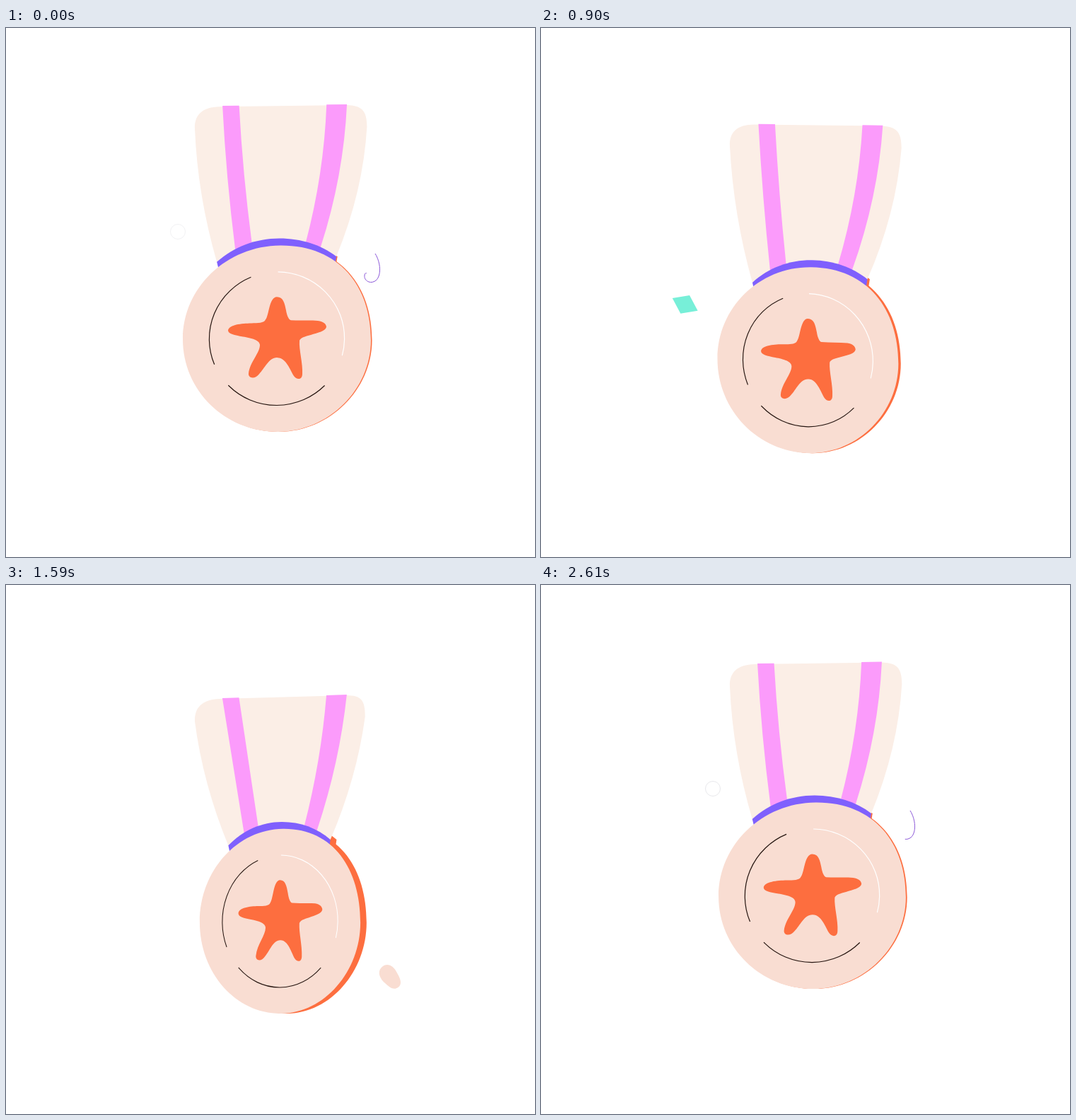
An HTML page with a canvas for the animation above (2.64 s loop, 748x748 px).

```html
<!DOCTYPE html>
<html lang="en">
<head>
<meta charset="utf-8">
<title>Medal</title>
<style>
  html, body { margin: 0; width: 100%; height: 100%; overflow: hidden; background: #fff; }
  canvas { display: block; }
</style>
</head>
<body>
<canvas id="stage" width="748" height="748"></canvas>
<script>
const ctx = document.getElementById('stage').getContext('2d');
const LOOP = 2640, STEP = 30, RAD = Math.PI / 180;
const CREAM = '#fbeee6', PEACH = '#f9ddd2', PINK = '#fb9bfb';
const PURPLE = '#7f60fd', ORANGE = '#fd6e3f', MINT = '#1de5be', DARK = '#24140f';

// time, medal centre x and y, medal half width, ribbon top, swing
const poses = [
  [0, 383, 439.2, 133, 109, -0.9],
  [390, 377.2, 448.5, 137.2, 111, 2],
  [690, 376.2, 460, 133.2, 123.3, 2.5],
  [1110, 379.6, 477, 122.5, 148.5, 1.7],
  [1590, 387.5, 475.5, 113.6, 157.5, -1.4],
  [2220, 389.7, 448.6, 122.8, 128.5, -3.4]
];

// Medal shapes, drawn around the medal centre
const face = new Path2D('M5-132C88-132 133-74 133 3C133 73 73 132 2 132C-73 132-133 73-133 0C-133-73-71-132 5-132Z');
const band = new Path2D('M-84-109C-60-131-28-142 4-142C34-142 63-133 85-116L83-104L0-90L-82-101Z');
const star = new Path2D('M0-59C9-59 11-50 13-40C14-33 17-26 20-26C32-25 46-26 58-25C66-24 70-20 70-16' +
  'C69-10 58-8 48-5C40-3 33-1 32 3C31 16 37 36 36 50C36 59 28 59 24 53C19 45 13 27 1 27' +
  'C-11 26-17 42-25 50C-31 58-41 56-40 49C-38 33-24 20-24 9C-24 2-36-1-48-3C-60-5-69-7-69-12' +
  'C-68-20-50-22-36-22C-27-22-18-22-16-27C-11-33-11-59 0-59Z');
const curl = new Path2D('M522 319C530 332 531 350 523 357C515 363 506 357 507 350C507 347 509 346 510 347');
const blob = new Path2D('M-19 0C-19-9-10-13 0-11C10-10 18-8 18 0C18 9 8 10-1 12C-11 13-19 9-19 0Z');

const clamp = x => Math.max(0, Math.min(1, x));
const ease = x => { x = clamp(x); return x * x * (3 - 2 * x); };
const bump = (t, a, b, c, d) => ease((t - a) / (b - a)) * (1 - ease((t - c) / (d - c)));

// Periodic cubic through the poses
function poseAt(t) {
  const n = poses.length;
  const key = i => {
    const turn = Math.floor(i / n), [time, ...rest] = poses[i - turn * n];
    return [time + turn * LOOP, ...rest];
  };
  let i = n - 1;
  while (poses[i][0] > t) i--;
  const [a, b, c, d] = [i - 1, i, i + 1, i + 2].map(key);
  const span = c[0] - b[0], u = (t - b[0]) / span;
  return [1, 2, 3, 4, 5].map(k => {
    const m = (c[k] - a[k]) / (c[0] - a[0]) * span;
    const w = (d[k] - b[k]) / (d[0] - b[0]) * span;
    return b[k] * (1 + 2 * u) * (1 - u) ** 2 + m * u * (1 - u) ** 2 +
      c[k] * u * u * (3 - 2 * u) + w * u * u * (u - 1);
  });
}

function fill(path, color) {
  ctx.fillStyle = color;
  ctx.fill(path);
}

function drawMedal(t) {
  const [cx, cy, rx, top, swing] = poseAt(t);
  const turn = 137.2 - rx, sx = rx / 133, sy = 1 - turn * 0.00045, skew = swing * 0.006;
  const place = dx => ctx.setTransform(sx, skew, 0, sy, cx + dx, cy);
  const reset = () => ctx.setTransform(1, 0, 0, 1, 0, 0);
  const hang = (u, v) => [cx + u * sx + swing, cy + v * sy + skew * u];
  const topY = x => top + (1.2 * swing - 0.4 - turn * 0.08) * (x - 394) / 146;

  // Back rim
  const rim = turn * 0.37;
  place(rim);
  fill(face, ORANGE);
  place(rim + swing);
  fill(band, ORANGE);
  reset();

  // Ribbon
  const right = 511 - turn * 0.14, sag = 0.1 + turn * 0.006;
  const [lx, ly] = hang(-84, -109), [ex, ey] = hang(85, -116);
  const yl = topY(267), yr = topY(right);
  const cloth = new Path2D();
  cloth.moveTo(lx, ly);
  cloth.quadraticCurveTo(267 + (lx - 267) * sag, (ly + yl + 32) / 2, 267, yl + 32);
  cloth.bezierCurveTo(266, yl + 12, 278, yl + 1, 302, topY(302) + 1);
  cloth.lineTo(482, topY(482) + 1);
  cloth.bezierCurveTo(502, yr + 2, right, yr + 8, right, yr + 32);
  cloth.quadraticCurveTo(right + (ex - right) * sag, (ey + yr + 32) / 2, ex, ey);
  cloth.lineTo(cx, cy - 90);
  fill(cloth, CREAM);

  const stripe = (x1, x2, u1, v1, u2, v2, bend) => {
    const [p, q] = hang(u1, v1), [r, s] = hang(u2, v2), y1 = topY(x1), y2 = topY(x2);
    const path = new Path2D();
    path.moveTo(x1, y1);
    path.quadraticCurveTo(x1 + (p - x1) * bend, (y1 + q) / 2, p, q);
    path.lineTo(p, q + 8);
    path.lineTo(r, s + 8);
    path.lineTo(r, s);
    path.quadraticCurveTo(x2 + (r - x2) * bend, (y2 + s) / 2, x2, y2);
    fill(path, PINK);
  };
  const shift = swing * 0.4;
  stripe(306.5 + shift, 330 + shift, -58, -127, -34.5, -136, 0.24 + turn * 0.011);
  stripe(453.6 + shift, 482.4 + shift, 41.5, -135, 63, -130, sag);

  place(swing);
  fill(band, PURPLE);

  // Front
  place(0);
  fill(face, PEACH);
  fill(star, ORANGE);
  ctx.lineWidth = 1.2;
  for (const [from, to, color] of [[157.5, 247.5, DARK], [45, 136, DARK], [-89, 15, '#fff']]) {
    ctx.beginPath();
    ctx.ellipse(0, 0, 95.6, 94.5, 0, from * RAD, to * RAD);
    ctx.strokeStyle = color;
    ctx.stroke();
  }
  reset();
}

function drawConfetti(t) {
  const late = t < 1320 ? t + LOOP : t; // time for pieces that cross the loop point

  ctx.lineWidth = 1;
  ctx.strokeStyle = '#e4e4e8';
  ctx.globalAlpha = bump(late, 2460, 2550, 2580, 2700);
  ctx.beginPath();
  ctx.arc(243, 288, 10.5, 0, 7);
  ctx.stroke();
  ctx.globalAlpha = 1;

  const drawn = clamp((late - 2535) / 105), erased = clamp((late - 2700) / 120);
  if (drawn > erased) {
    const length = 69;
    ctx.strokeStyle = '#8a55d8';
    ctx.setLineDash([0, erased * length, (drawn - erased) * length, 200]);
    ctx.stroke(curl);
    ctx.setLineDash([]);
  }

  if (t >= 330 && t < 450) {
    ctx.strokeStyle = '#b76cc4';
    ctx.beginPath();
    ctx.moveTo(534, 345);
    ctx.quadraticCurveTo(540, 346, 544.5, 349.5);
    ctx.stroke();
  }

  const glow = clamp((t - 315) / 210) * (1 - clamp((t - 840) / 150));
  if (glow > 0) {
    const long = Math.min(20, 14 + (t - 390) * 0.012), short = long * 0.72;
    ctx.save();
    ctx.translate(203.7, 390.8);
    ctx.rotate((94 + (t - 390) * 0.22) * RAD);
    ctx.globalAlpha = glow;
    fill(new Path2D(`M${long} 0L0 ${short}L${-long} 0L0 ${-short}Z`), MINT);
    ctx.restore();
  }

  const size = bump(t, 1350, 1530, 1590, 1830);
  if (size > 0) {
    ctx.save();
    ctx.translate(543.8, 554.5);
    ctx.rotate(54 * RAD);
    ctx.scale(size, size);
    fill(blob, PEACH);
    ctx.restore();
  }

  ctx.fillStyle = ORANGE;
  ctx.beginPath();
  ctx.arc(474.5, 614, 8.5 * bump(t, 2040, 2265, 2310, 2490), 0, 7);
  ctx.fill();
}

function render(now) {
  const t = Math.floor(now % LOOP / STEP) * STEP;
  ctx.fillStyle = '#fff';
  ctx.fillRect(0, 0, 748, 748);
  drawConfetti(t);
  drawMedal(t);
  requestAnimationFrame(render);
}
requestAnimationFrame(render);
</script>
</body>
</html>
```
